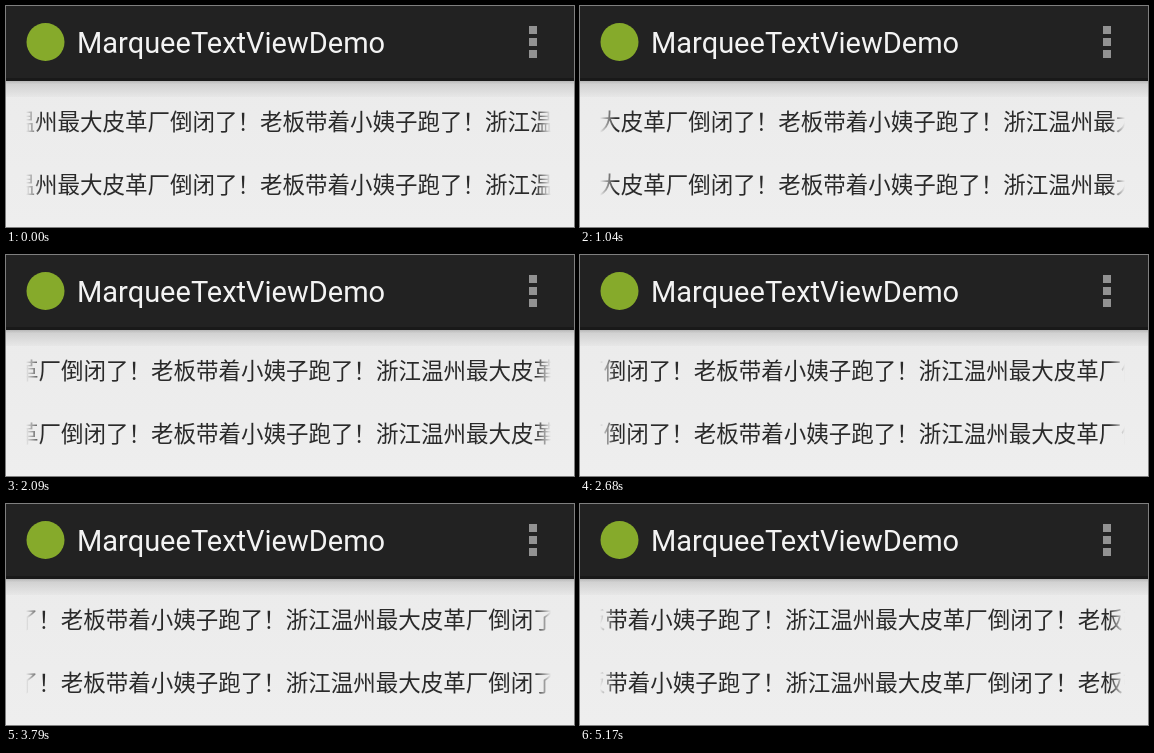
An HTML page that plays this animation: 568 px wide and 221 px high, repeating every 5.27 s.

```html
<!DOCTYPE html>
<html lang="zh-CN">
<head>
<meta charset="utf-8">
<style>
  html, body { margin: 0; width: 100%; height: 100%; overflow: hidden; background: #ececec; }
  svg { display: block; }
  .title { font: 29px Roboto, sans-serif; fill: #f3f3f3; }
  .row { font: 22.5px "Noto Sans CJK SC", "Noto Sans CJK", sans-serif; fill: #2a2a2a; white-space: pre; }
</style>
</head>
<body>
<svg width="568" height="221" viewBox="0 0 568 221">
  <defs>
    <linearGradient id="page" x2="0" y2="1">
      <stop stop-color="#eaeaea"/><stop offset="1" stop-color="#eeeeee"/>
    </linearGradient>
    <linearGradient id="shadow" x2="0" y2="1">
      <stop stop-opacity=".22"/>
      <stop offset=".2" stop-opacity=".11"/>
      <stop offset="1" stop-opacity=".02"/>
    </linearGradient>
    <linearGradient id="fade" gradientUnits="userSpaceOnUse" x1="20" x2="545">
      <stop stop-color="#fff" stop-opacity="0"/>
      <stop offset=".03" stop-color="#fff"/>
      <stop offset=".97" stop-color="#fff"/>
      <stop offset="1" stop-color="#fff" stop-opacity="0"/>
    </linearGradient>
    <mask id="edges" maskUnits="userSpaceOnUse" x="0" y="90" width="568" height="131">
      <rect x="20" y="90" width="525" height="131" fill="url(#fade)"/>
    </mask>
  </defs>
  <rect width="568" height="221" fill="url(#page)"/>
  <rect y="75" width="568" height="16" fill="url(#shadow)"/>
  <rect width="568" height="75" fill="#222"/>
  <rect y="72" width="568" height="3" fill="#191919"/>
  <circle cx="39.5" cy="36" r="19" fill="#86aa2b"/>
  <text class="title" x="71" y="47">MarqueeTextViewDemo</text>
  <path d="M523 20h8v8h-8zM523 32h8v8h-8zM523 44h8v8h-8z" fill="#929292"/>
  <g mask="url(#edges)">
    <text class="row" y="124"></text>
    <text class="row" y="187"></text>
  </g>
</svg>
<script>
const LOOP = 5270, SCROLL_END = 5170, STEP = 43, LEAD = 4;
const WIDTH = 23 * 22.5;
const rows = document.querySelectorAll('.row');
rows.forEach(r => r.textContent = '浙江温州最大皮革厂倒闭了！老板带着小姨子跑了！'.repeat(3));

// Time and x of the sentence start: nearly constant speed
const path = [[0, 479], [560, 447.5], [3180, 312.3], [SCROLL_END, 204.7]];

function position(t) {
  const i = Math.max(1, path.findIndex(p => p[0] >= t));
  const [t0, x0] = path[i - 1], [t1, x1] = path[i];
  return x0 + (x1 - x0) * (t - t0) / (t1 - t0);
}

const origin = performance.now();
function draw() {
  const t = Math.min((performance.now() - origin) % LOOP, SCROLL_END);
  const x = position(Math.floor((t + LEAD) / STEP) * STEP) - WIDTH;
  rows.forEach(r => r.setAttribute('x', x));
  requestAnimationFrame(draw);
}
draw();
</script>
</body>
</html>
```
